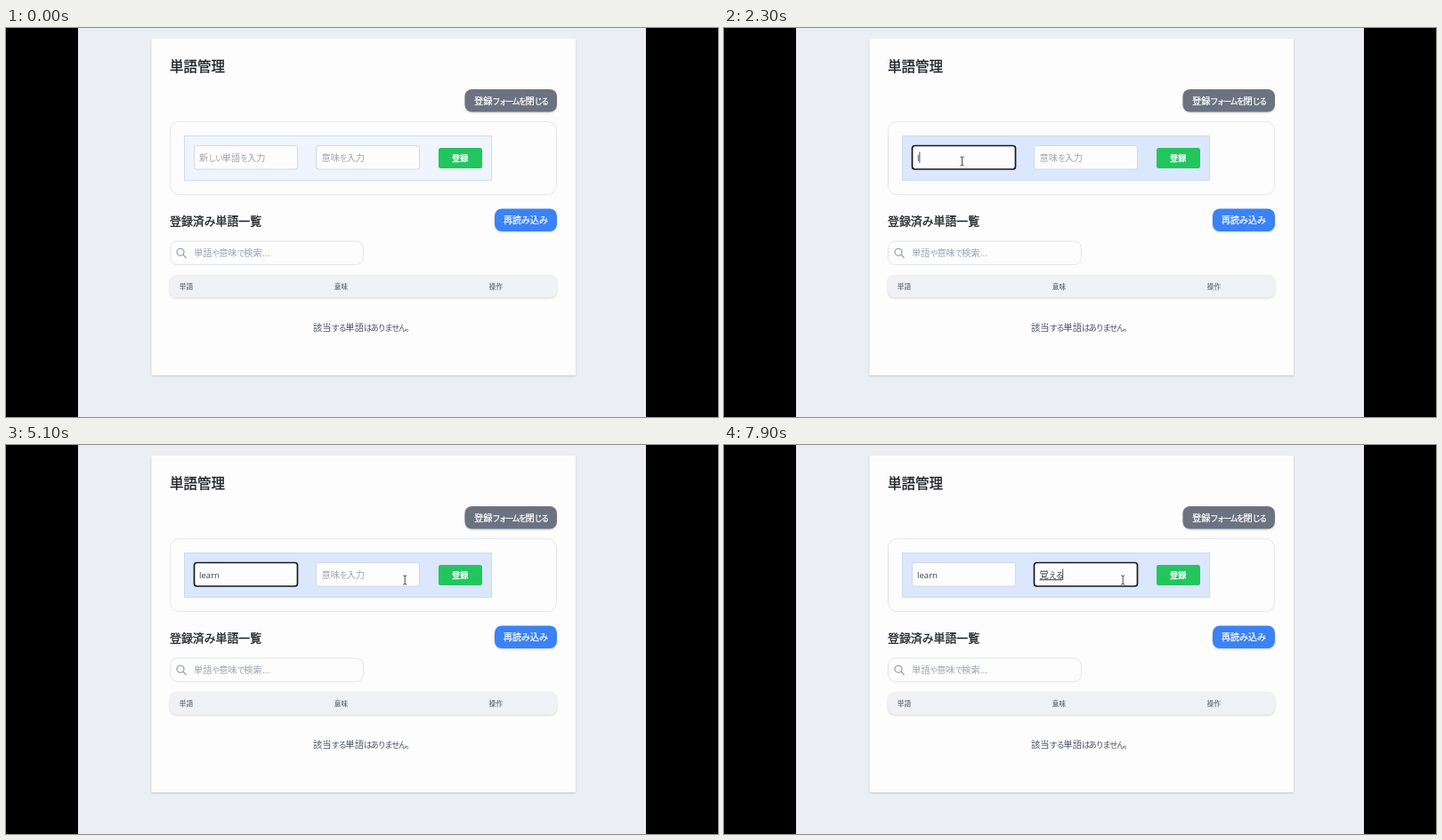
Write an HTML page that moves like this. It is 800 px wide and 438 px high and loops after 8 s.

```html
<!DOCTYPE html>
<html lang="ja">
<head>
<meta charset="utf-8">
<style>
  html, body { margin: 0; width: 100%; height: 100%; overflow: hidden; background: #000; }
  svg { display: block; width: 100%; height: 100%; }
  text { font-family: "Noto Sans CJK JP", "Noto Sans CJK", sans-serif; white-space: pre; }
  .kana { font-size: .9em; letter-spacing: -.15em; }
  .tight .kana { font-size: .87em; letter-spacing: -.17em; }
  .latin { font-family: "Open Sans", "Noto Sans", sans-serif; }
  .wide { letter-spacing: .04em; }
  .soft { filter: drop-shadow(0 1px 1px rgba(0, 0, 0, .16)); }
</style>
</head>
<body>
<svg viewBox="0 0 800 438">
  <rect x="81" width="638" height="438" fill="#ebeef4"/>
  <rect class="soft" x="163.5" y="12" width="476.5" height="379" rx="1" fill="#fdfdfd"/>

  <rect class="soft" x="515.5" y="69" width="103.5" height="25.5" rx="8" fill="#6b7280"/>
  <rect x="184.5" y="105.5" width="434" height="82" rx="10" fill="none" stroke="#e5e7eb"/>
  <rect id="form" x="200.5" y="121.5" width="345" height="50" stroke="#c9dcf8"/>
  <rect id="box0" x="211.5" y="132.5" width="116" height="26.5" fill="#fdfdfd"/>
  <rect id="box1" x="348.5" y="132.5" width="116" height="26.5" fill="#fdfdfd"/>
  <rect x="486" y="135" width="49" height="23" rx="2.5" fill="#22c55e"/>

  <rect class="soft" x="549" y="203.5" width="70" height="25.5" rx="8" fill="#3b82f6"/>
  <rect x="184.5" y="240" width="217" height="26.5" rx="8" fill="#fdfdfd" stroke="#e2e5ea"/>
  <g fill="none" stroke="#9ca3af" stroke-width="1.3" stroke-linecap="round">
    <circle cx="196" cy="252.3" r="4"/>
    <path d="M199 255.3l3.2 3.2"/>
  </g>
  <rect class="soft" x="184" y="278" width="435" height="25.5" rx="8" fill="#f0f1f5"/>

  <g id="labels"></g>
  <path id="underline" fill="none" stroke="#333"/>
  <path id="caret" fill="none" stroke="#222" stroke-width=".8"/>
  <path id="pointer" d="M-2 -5Q0 -5 0 -4Q0 -5 2 -5M0 -4V4M-2 5Q0 5 0 4Q0 5 2 5" fill="none" stroke="#333" stroke-width=".9"/>
</svg>
<script>
const $ = id => document.getElementById(id);

// Kana are set narrower than kanji.
const markup = s => s.replace(/[ぁ-まむ-んァ-ー。]+/g, '<tspan class="kana">$&</tspan>');

function label(x, y, size, fill, str, bold = 0, cls = '') {
  const el = document.createElementNS('http://www.w3.org/2000/svg', 'text');
  const attrs = { x, y, 'font-size': size, fill, stroke: fill, 'stroke-width': bold, class: cls };
  for (const k in attrs) el.setAttribute(k, attrs[k]);
  el.innerHTML = markup(str);
  $('labels').append(el);
  return el;
}

label(184, 49.2, 15.5, '#1f2328', '単語管理', .35);
label(526, 85.6, 10.3, '#fff', '登録フォームを閉じる', .25, 'tight');
label(501, 149.8, 9.2, '#fff', '登録', .35);
label(184, 221.6, 12.9, '#1f2328', '登録済み単語一覧', .3);
label(559, 220.3, 10, '#fff', '再読み込み', .25);
label(211, 257.3, 10.2, '#9ca3af', '単語や意味で検索...');
label(345, 340.8, 10.3, '#4b5563', '該当する単語はありません。');
['単語', '意味', '操作'].forEach((s, i) => label(194.7 + 174 * i, 293.7, 7.6, '#5f6673', s, .12, 'wide'));

const fields = [
  { x: 217, hint: '新しい単語を入力', focus: 1500, blur: 5500, cls: 'latin', size: 9.6,
    keys: [[2200, 'l'], [2500, 'le'], [2800, 'lea'], [3100, 'lear'], [3400, 'learn']] },
  { x: 354.5, hint: '意味を入力', focus: 5500, blur: 8000, cls: '', size: 10.3, ime: true,
    keys: [[6600, 'お'], [7000, 'おb'], [7100, 'おぼ'], [7300, 'おぼえ'], [7500, 'おぼえr'], [7600, 'おぼえる'], [7800, '覚える']] }
];
for (const f of fields) {
  f.hintEl = label(f.x, 149.8, 10.2, '#9ca3af', f.hint);
  f.textEl = label(f.x, 149.6, f.size, '#374151', '', 0, f.cls);
}

const ease = (t, a, b) => {
  const p = Math.min(1, Math.max(0, (t - a) / (b - a)));
  return p * p * (3 - 2 * p);
};
const mix = (a, b, p) => a + (b - a) * p;

function draw(t) {
  const hover = ease(t, 0, 400);
  $('form').setAttribute('fill', `rgb(${mix(239, 218, hover)},${mix(244, 231, hover)},${mix(254, 252, hover)})`);
  $('caret').setAttribute('d', '');
  $('underline').setAttribute('d', '');

  fields.forEach((f, i) => {
    const key = f.keys.filter(k => k[0] <= t).pop() || [f.focus, ''];
    f.hintEl.setAttribute('visibility', key[1] ? 'hidden' : 'visible');
    f.textEl.innerHTML = markup(key[1]);

    const on = t >= f.focus && t < f.blur;
    const box = $('box' + i);
    box.setAttribute('stroke', on ? '#17191d' : '#cfd9e8');
    box.setAttribute('stroke-width', on ? 1.7 : 1);
    box.setAttribute('rx', on ? 3 : 2.5);
    if (!on) return;

    const end = f.x + (key[1] ? f.textEl.getComputedTextLength() : 0);
    if ((t - key[0]) % 1000 < 500) $('caret').setAttribute('d', `M${end + .4} 139.5V152`);
    if (f.ime && key[1]) {
      $('underline').setAttribute('d', `M${f.x} 151.8H${end}`);
      $('underline').setAttribute('stroke-width', t >= 7800 ? 1 : .5);
    }
  });

  const enter = ease(t, 1000, 1300), move = ease(t, 4500, 5000);
  const x = mix(mix(278, 267.5, enter), 448.2, move);
  const y = mix(mix(161, 150, enter), 152, move);
  $('pointer').setAttribute('transform', `translate(${x} ${y})`);
  $('pointer').setAttribute('visibility', t >= 1000 ? 'visible' : 'hidden');
}

const start = performance.now();
function tick() {
  const t = (performance.now() - start) % 8000;
  draw(Math.floor(t / 100) * 100);
  requestAnimationFrame(tick);
}
tick();
</script>
</body>
</html>
```
